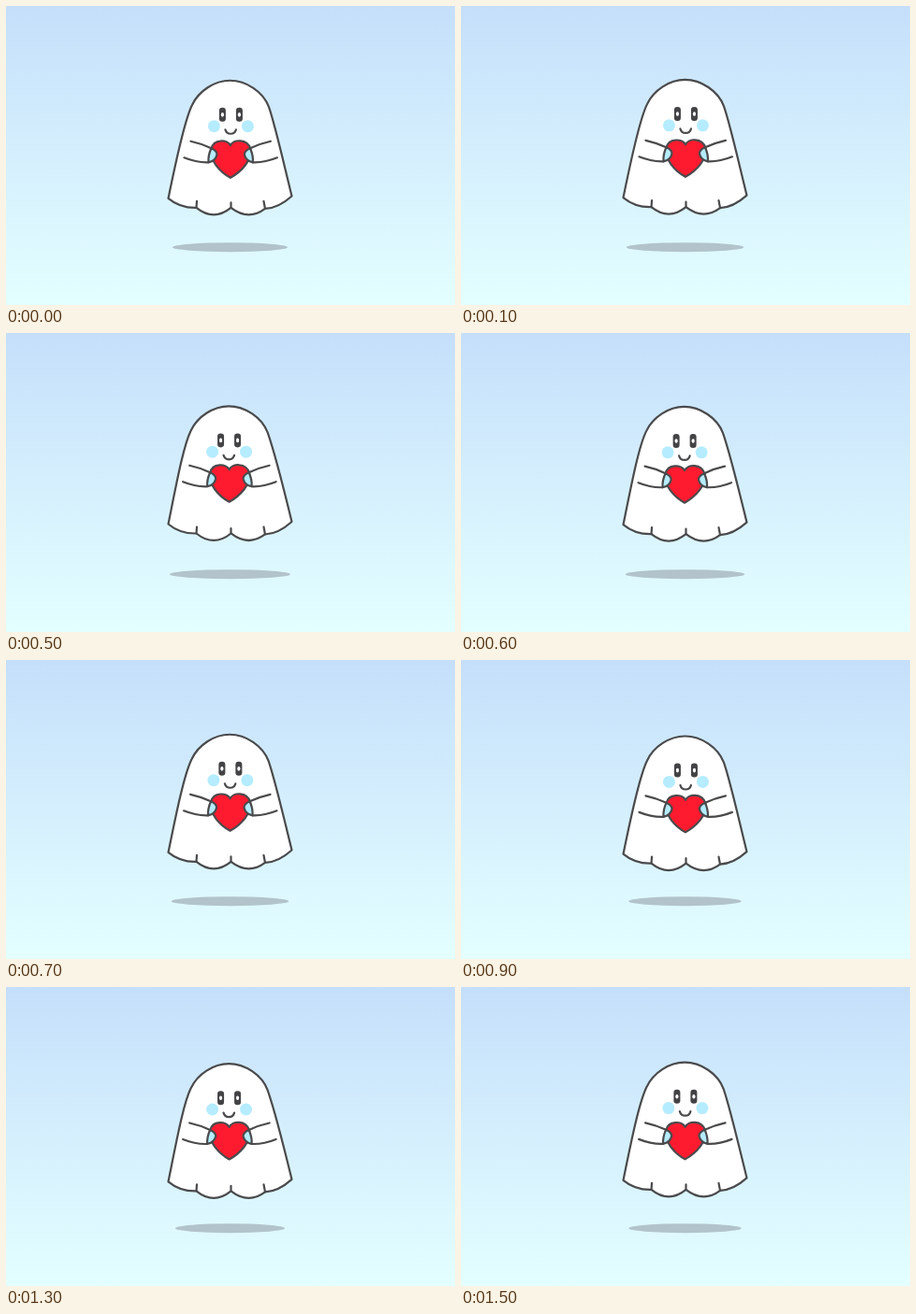
Animation of 480 by 320 pixels, one loop 1.6 s. Source, as an HTML page:

```html
<!DOCTYPE html>
<html lang="en">
<head>
<meta charset="utf-8">
<title>Floating ghost</title>
<style>
  html, body { margin: 0; width: 100%; height: 100%; overflow: hidden; }
  svg { display: block; width: 480px; height: 320px; }
  .line { fill: none; stroke: #4a4a4c; stroke-width: 2.2; stroke-linecap: round; stroke-linejoin: round; }
  .white { fill: #fff; }
  .blue { fill: #b5ecff; }
  .red { fill: #ff1b2f; }
  .dark { fill: #434345; }
</style>
</head>
<body>
<svg viewBox="0 0 480 320">
  <defs>
    <linearGradient id="sky" x2="0" y2="1">
      <stop stop-color="#c5dffb"/>
      <stop offset="1" stop-color="#e4ffff"/>
    </linearGradient>
    <g id="eye">
      <rect class="dark" x="-3.5" y="-7.5" width="7" height="15" rx="3.3"/>
      <ellipse class="white" rx="1.6" ry="2.3"/>
    </g>
    <g id="arm" class="line">
      <path class="blue" d="M219.5 152.5Q226 155.5 225.5 159.5Q224 166 216.5 167.5Q216 160 219.5 152.5"/>
      <path d="M197.5 145Q209 147.500 219.500 152.500M190.500 162.500Q204 168 216.500 167.500"/>
    </g>
  </defs>
  <rect width="480" height="320" fill="url(#sky)"/>
  <ellipse id="shadow" cx="239.5" cy="258.2" ry="5" fill="#b2c3cb"/>
  <g id="body" class="line">
    <path id="sheet" class="white"/>
    <path d="M204 209L203.500 216M240.500 210.500V216M275.500 209L277 217"/>
  </g>
  <g id="face">
    <circle class="blue" cx="222.5" cy="128.7" r="6.5"/>
    <circle class="blue" cx="258.5" cy="128.700" r="6.5"/>
    <path class="line" d="M234.500 132.300C236 138.300 244.500 138.300 246 132.300"/>
    <use class="eye" href="#eye" data-x="231.5"/>
    <use class="eye" href="#eye" data-x="249.5"/>
  </g>
  <g id="hold">
    <path class="line red" d="M240 149.500C237 143 222 142 219.500 153C217 165 229 178 240 184C251 178 264 165 261.500 153C258 142 243 142.500 240 149.500Z"/>
    <use href="#arm"/>
    <use href="#arm" transform="translate(480.5) scale(-1 1)"/>
  </g>
</svg>
<script>
const LOOP = 1600, STEP = 100;
const get = id => document.getElementById(id);
const eyes = document.querySelectorAll('.eye');
const wave = (t, peak, period = LOOP) => Math.cos(2 * Math.PI * (t - peak) / period);
const move = (id, x, y) => get(id).setAttribute('transform', `translate(${x} ${y})`);

// The head leans while the hem keeps its horizontal place.
function sheetPath(lean) {
  const x = value => value + lean;
  return `M173.5 206C182 164 ${x(191)} 122 ${x(199)} 106
    C${x(206)} 91 ${x(223)} 79.8 ${x(239.5)} 79.8
    C${x(257)} 79.8 ${x(275)} 92 ${x(281)} 108
    C${x(287)} 125 292 148 305.5 203.5
    Q291 216.5 277 217Q259 230.5 240.5 216
    Q222 231 203.5 216Q186 216.5 173.5 206Z`;
}

function draw(t) {
  const sway = wave(t, 50, 800) - 1;
  const bob = 0.4 - 2.3 * wave(t, 350);
  const holdBob = -0.9 - 2 * wave(t, 400) + 0.7 * wave(t, 0, 800);
  const open = Math.min(1, 0.18 + Math.abs(t - 300) / 160);

  get('shadow').setAttribute('rx', 61.5 + 3.2 * wave(t, 400));
  get('sheet').setAttribute('d', sheetPath(sway * 0.7));
  move('body', 0, bob);
  move('face', sway, bob);
  move('hold', sway * 0.7, holdBob);
  for (const eye of eyes)
    eye.setAttribute('transform', `translate(${eye.dataset.x} 116.4) scale(1 ${open})`);
}

function tick() {
  draw(Math.floor(performance.now() % LOOP / STEP) * STEP);
  requestAnimationFrame(tick);
}
tick();
</script>
</body>
</html>
```
